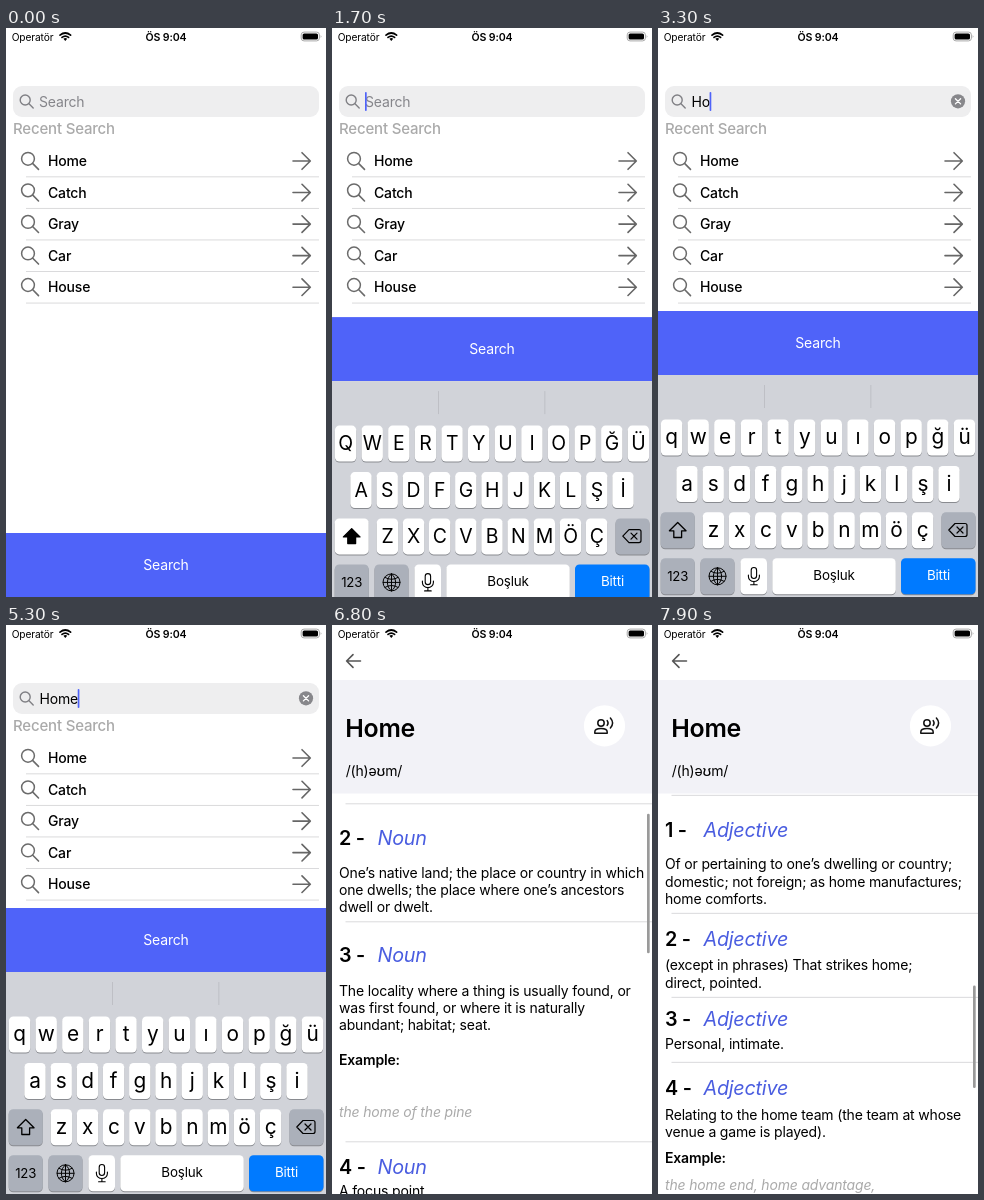
Recreate the animation shown at these times as an HTML page. Size 320 by 569 pixels, loop 8 s.

```html
<!DOCTYPE html>
<html lang="en">
<head>
<meta charset="utf-8">
<style>
  html, body { margin: 0; height: 100%; overflow: hidden; background: #fff; }
  svg { display: block; width: 100%; height: 100%; font-family: Inter, "Noto Sans", sans-serif; }
  text { letter-spacing: -.012em; white-space: pre; }
  .line { fill: none; stroke-linecap: round; stroke-linejoin: round; }
</style>
</head>
<body>
<svg id="stage" viewBox="0 0 320 569"></svg>
<script>
const LOOP = 8000, STEP = 100;
const KEYBOARD_HEIGHT = 222, HEADER_BOTTOM = 168.5;
const BLUE = '#4f63f9';

// Text is placed by the middle of its capitals.
const text = (s, x, y, size = 14, attrs = '') =>
  `<text x="${x}" y="${y + size * .36}" font-size="${size}" ${attrs}>${s}</text>`;
const rect = (x, y, w, h, fill, r = 0, attrs = '') =>
  `<rect x="${x}" y="${y}" width="${w}" height="${h}" rx="${r}" fill="${fill}" ${attrs}/>`;
const line = (d, color = '#666', width = 1.6, attrs = '') =>
  `<path class="line" d="${d}" stroke="${color}" stroke-width="${width}" ${attrs}/>`;
const group = (id, body, attrs = '') => `<g id="${id}" ${attrs}>${body}</g>`;
const MIDDLE = 'text-anchor="middle"';

// ---- search page ----
function searchPage() {
  const rows = ['Home', 'Catch', 'Gray', 'Car', 'House'].map((word, i) => {
    const y = 133 + i * 31.55;
    return `<circle cx="22" cy="${y - 2.2}" r="6.4" fill="none" stroke="#6b6b6b" stroke-width="1.5"/>` +
      line(`M26.8 ${y + 2.6}L32.5 ${y + 8.4}`, '#6b6b6b') +
      text(word, 42, y, 14, 'font-weight="500"') +
      line(`M287 ${y}H304M296 ${y - 8.3}L304.3 ${y}L296 ${y + 8.3}`) +
      rect(20, y + 15.4, 293, .9, '#d6d6d8');
  }).join('');
  return rect(0, 0, 320, 569, '#fff') +
    rect(7, 58, 306, 31, '#eeeeef', 9) +
    '<circle cx="19.2" cy="72" r="5" fill="none" stroke="#808085" stroke-width="1.4"/>' +
    line('M23 75.8L27.2 80', '#808085', 1.4) +
    group('placeholder', text('Search', 33, 73.5, 14, 'fill="#85858a"')) +
    group('typed', text('', 33.5, 73.5)) +
    group('clear', '<circle cx="300" cy="73.3" r="7.1" fill="#87878b"/>' +
      line('M297.4 70.7l5.2 5.2m0-5.2l-5.2 5.2', '#fff', 1.3)) +
    rect(0, 64, 1.7, 19, BLUE, .8, 'id="cursor"') +
    text('Recent Search', 7, 101, 15, 'fill="#aaa" font-weight="500"') + rows +
    group('button', rect(0, 505, 320, 64, BLUE) +
      text('Search', 160, 537, 14, `id="buttonLabel" fill="#fff" ${MIDDLE}`));
}

// ---- keyboard ----
const ROWS = [
  { chars: 'qwertyuıopğü', y: 391.5, pitch: 26.62, width: 21.4 },
  { chars: 'asdfghjklşi', y: 438, pitch: 26.2, width: 21.4 },
  { chars: 'zxcvbnmöç', y: 484.3, pitch: 26.15, width: 21.4 },
];
const keyX = (row, i) => 160 + (i - (row.chars.length - 1) / 2) * row.pitch;
const key = (x, y, w, fill = '#fff') =>
  rect(x, y + 1, w, 36, '#898b90', 4.5) + rect(x, y, w, 36, fill, 4.5);
const upper = c => c.toLocaleUpperCase('tr');

function letters(convert, size) {
  return ROWS.map(row => [...row.chars].map((c, i) =>
    `<text x="${keyX(row, i)}" y="${row.y + 24.7}" font-size="${size}" ${MIDDLE}>${convert(c)}</text>`
  ).join('')).join('');
}

function shiftKey(keyFill, arrowFill) {
  return key(2.7, 484.3, 34, keyFill) +
    line('M19.7 494.5l8.3 8.3h-4.4v6.7h-7.8v-6.7h-4.4z', '#000', 1.3, `style="fill:${arrowFill}"`);
}

function keyboard() {
  const gray = '#abb0ba', y = 530.3;
  const caps = ROWS.map(row => [...row.chars].map((c, i) =>
    key(keyX(row, i) - row.width / 2, row.y, row.width)).join('')).join('');
  return rect(0, 347, 320, 224, '#d1d3d9') +
    rect(106, 357, .9, 23, '#bbbdc3') + rect(212.4, 357, .9, 23, '#bbbdc3') + caps +
    group('upper', shiftKey('#fff', '#000') + letters(upper, 19.4)) +
    group('lower', shiftKey(gray, 'none') + letters(c => c, 20.8)) +
    key(283.5, 484.3, 34, gray) +
    line('M297 495.5h10q2 0 2 2v9q0 2-2 2h-10l-6.2-6.5zM299 499l6 6m0-6l-6 6', '#000', 1.2) +
    key(2.7, y, 34, gray) + text('123', 19.7, 548.3, 13.2, MIDDLE) +
    key(42.5, y, 34, gray) +
    line('M51 548.3a8.5 8.5 0 1 0 17 0a8.5 8.5 0 1 0-17 0h17M59.5 539.8v17' +
      'M59.5 539.8c-5.5 4-5.5 13 0 17c5.5-4 5.5-13 0-17M53 543.3q6.5 4 13 0M53 553.3q6.5-4 13 0', '#000', 1) +
    key(82.4, y, 26.6) +
    rect(93.2, 539.5, 5.4, 11, 'none', 2.7, 'stroke="#000" stroke-width="1.1"') +
    line('M90.4 547v1.5a5.5 5 0 0 0 11 0V547M95.9 553.6v3M92.6 556.8h6.6', '#000', 1.1) +
    key(114.3, y, 123.5) + text('Boşluk', 176, 547.5, 13.4, MIDDLE) +
    key(243, y, 74.5, '#007aff') + text('Bitti', 280.5, 547.5, 13.4, `${MIDDLE} fill="#fff"`) +
    group('popup', '<path d="M-18-48h36q6 0 6 6v28c0 9-13.3 8-13.3 18V32q0 4-4 4H-6.7q-4 0-4-4V4' +
      'c0-10-13.3-9-13.3-18v-28q0-6 6-6z" fill="#fff"/>' + text('', 0, -25, 30, MIDDLE),
      'style="filter:drop-shadow(0 0 1.5px #0006)"');
}

// ---- detail page ----
const SENSES = [
  { head: '1 Noun', y: 189, bodyY: 215, body: ['A dwelling.'], end: 234 },
  { head: '2 Noun', y: 268, bodyY: 302.7, body: ['One’s native land; the place or country in which',
    'one dwells; the place where one’s ancestors', 'dwell or dwelt.'], end: 352 },
  { head: '3 Noun', y: 385.5, bodyY: 421, body: ['The locality where a thing is usually found, or',
    'was first found, or where it is naturally', 'abundant; habitat; seat.'],
    exampleY: 490, quoteY: 542, quote: 'the home of the pine', end: 572 },
  { head: '4 Noun', y: 597, bodyY: 621, body: ['A focus point.'], end: 640 },
  { head: '1 Verb', y: 665, bodyY: 691, body: ['(of animals) To return to its owner.'],
    exampleY: 718, quoteY: 743.5, quote: 'The dog homed.', end: 762 },
  { head: '2 Verb', y: 788, bodyY: 814.5, body: ['(always with "in on") To seek or aim', 'for something.'],
    exampleY: 858, quoteY: 893, quote: 'The missile was able to home in on the target.', end: 916.3 },
  { head: '1 Adjective', y: 951, bodyY: 985.5, body: ['Of or pertaining to one’s dwelling or country;',
    'domestic; not foreign; as home manufactures;', 'home comforts.'], end: 1034.3 },
  { head: '2 Adjective', y: 1060, bodyY: 1086.5, body: ['(except in phrases) That strikes home;',
    'direct, pointed.'], end: 1118.3 },
  { head: '3 Adjective', y: 1139.5, bodyY: 1165, body: ['Personal, intimate.'], end: 1183.3 },
  { head: '4 Adjective', y: 1209, bodyY: 1236, body: ['Relating to the home team (the team at whose',
    'venue a game is played).'], exampleY: 1279, quoteY: 1306, quote: 'the home end, home advantage,', end: 1345 },
];

function sense(s) {
  const [number, kind] = s.head.split(' ');
  return text(number + ' -', 7, s.y, 19.8, 'font-weight="600"') +
    text(kind, 45.5, s.y, 19.8, 'font-style="italic" fill="#4a5de0"') +
    s.body.map((row, i) => text(row, 7, s.bodyY + i * 17.2)).join('') +
    (s.quote ? text('Example:', 7, s.exampleY, 14, 'font-weight="600"') +
      text(s.quote, 7, s.quoteY, 14, 'font-style="italic" fill="#aaa"') : '') +
    rect(13.5, s.end - .4, 307, .9, '#d6d6d8');
}

function detailPage() {
  return rect(0, 0, 320, 569, '#fff') +
    group('content', SENSES.map(sense).join('')) +
    rect(315, 0, 2.7, 0, '#9a9a9a', 1.3, 'id="indicator"') +
    rect(0, 0, 320, 55, '#fff') + rect(0, 55, 320, HEADER_BOTTOM - 55, '#f2f2f7') +
    text('Home', 13.3, 103, 24.9, 'font-weight="600"') +
    text('/(h)əʊm/', 13.7, 146.3) +
    '<circle cx="272.5" cy="100.8" r="20.6" fill="#fff"/>' +
    '<circle cx="269" cy="98" r="3.2" fill="none" stroke="#111" stroke-width="1.5"/>' +
    line('M262.8 108.2v-1.3c0-4.6 12.4-4.6 12.4 0v1.3zM275.2 95.6q1.8 2.4 0 4.8M278.4 93q4.4 5 0 10', '#111', 1.5);
}

function statusBar() {
  return text('Operatör', 5.7, 9, 10.2) +
    line('M54 7.2q5.3-4.4 10.6 0M56 9.4q3.3-2.7 6.6 0', '#000', 1.7) +
    '<path d="M57.4 10.8q1.9-1.5 3.8 0l-1.9 2.2z"/>' +
    text('ÖS 9:04', 160, 9, 10.6, `${MIDDLE} font-weight="600"`) +
    rect(295.2, 4.1, 18.2, 8.8, '#fff', 2.8, 'stroke="#a0a0a0" stroke-width=".9"') +
    rect(296.6, 5.5, 15.4, 6, '#000', 1.6) +
    '<path d="M314.7 7q1.6 1.5 0 3z" fill="#a0a0a0"/>';
}

// The keyboard lies above the dimming layer.
document.getElementById('stage').innerHTML =
  group('search', searchPage()) +
  rect(0, 0, 320, 569, '#000', 0, 'id="dim"') +
  group('keyboard', keyboard()) +
  group('detail', detailPage()) +
  group('back', line('M14.6 36H28.5M21 29.6L14.6 36L21 42.4', '#555', 1.6)) +
  statusBar();

const el = id => document.getElementById(id);
const show = (id, opacity) => el(id).setAttribute('opacity', Number(opacity));
const move = (id, x, y) => el(id).setAttribute('transform', `translate(${x} ${y})`);

// ---- motion ----
const FOCUS = 1400, PUSH = 5600;
const STROKES = [
  { char: 'h', down: 2300, typed: 2600, up: 2600 },
  { char: 'o', down: 3100, typed: 3200, up: 3300 },
  { char: 'm', down: 3600, typed: 3700, up: 3700 },
  { char: 'e', down: 4200, typed: 4300, up: 4400 },
];
const CURSOR_X = [33, 43.6, 51.6, 63.7, 71.7];

// Critically damped spring from 0 to 1.
function spring(ms, rate) {
  const x = Math.max(0, ms) / 1000 * rate;
  return 1 - (1 + x) * Math.exp(-x);
}

function blink(ms) {
  if (ms < 500 || ms >= 1000) return 1;
  return ms < 700 ? 1 - (ms - 400) / 300 : ms < 900 ? 0 : .5;
}

function scrollOffset(t) {
  if (t < 6700) return 0;
  if (t < 7000) return 287 * ((t - 6700) / 300) ** 1.5;
  return 837 - 302 * Math.exp((7300 - t) / 500);
}

function drawPopup(t, isUpper) {
  const stroke = STROKES.find(s => t >= s.down && t < s.up);
  show('popup', !!stroke);
  if (!stroke) return;
  const row = ROWS.find(r => r.chars.includes(stroke.char));
  move('popup', keyX(row, row.chars.indexOf(stroke.char)), row.y);
  el('popup').lastChild.textContent = isUpper ? upper(stroke.char) : stroke.char;
}

function draw(t) {
  const count = STROKES.filter(s => t >= s.typed).length;
  const lastInput = count ? STROKES[count - 1].typed : FOCUS;
  const raised = spring(t - 1280, 13);
  const pushed = spring(t - PUSH, 17.4);

  el('typed').firstChild.textContent = 'Home'.slice(0, count);
  show('placeholder', !count);
  show('clear', count > 0);
  show('cursor', t >= 1300 && t <= PUSH ? blink(t - lastInput) : 0);
  el('cursor').setAttribute('x', CURSOR_X[count]);

  move('button', 0, t > PUSH ? 0 : -KEYBOARD_HEIGHT * raised);
  show('buttonLabel', t >= 4800 && t < 5000 ? .2 + (t - 4800) / 250 : 1);
  show('upper', !count);
  show('lower', count > 0);
  drawPopup(t, !count);

  move('search', -96 * pushed, 0);
  move('keyboard', -96 * pushed, KEYBOARD_HEIGHT * (1 - raised));
  show('dim', .1 * pushed);
  move('detail', 320 * (1 - pushed), 0);
  show('detail', t > PUSH);
  show('back', pushed);

  const offset = scrollOffset(t);
  const visible = .284 - .000133 * (offset - 535);
  move('content', 0, -offset);
  el('indicator').setAttribute('y', HEADER_BOTTOM + 1 + offset * visible);
  el('indicator').setAttribute('height', 401 * visible);
  show('indicator', offset > 0);
}

const start = performance.now();
function tick() {
  const t = (performance.now() - start) % LOOP;
  draw(Math.floor(t / STEP) * STEP);
  requestAnimationFrame(tick);
}
tick();
</script>
</body>
</html>
```
